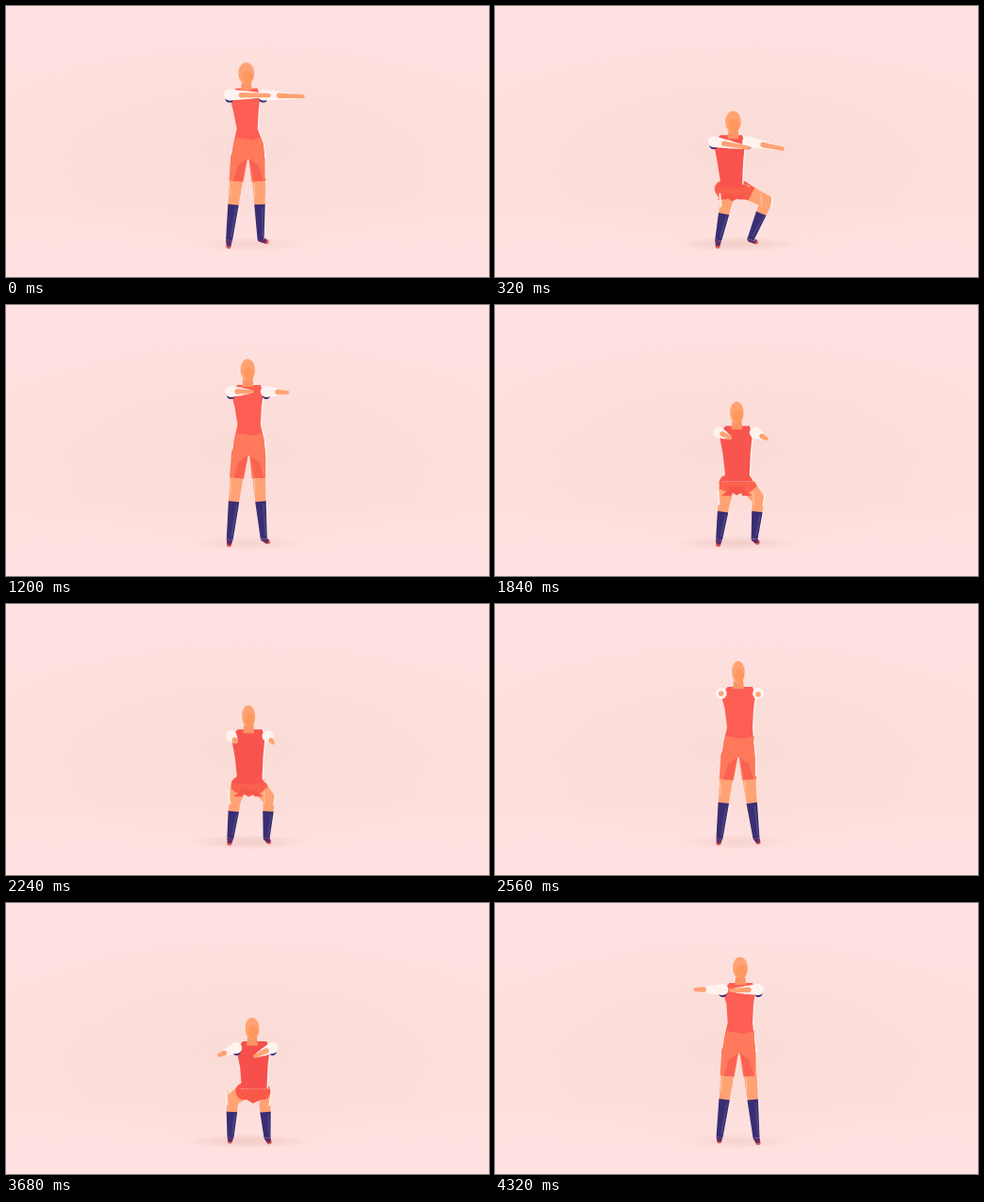
These frames come from a looping animation (512 px wide and 288 px high, 4400 ms). An HTML page with a canvas:

```html
<!DOCTYPE html>
<html lang="en">
<head>
<meta charset="utf-8">
<title>Squats</title>
<style>
html, body { margin: 0; width: 100%; height: 100%; overflow: hidden; background: #ffe1e1; }
canvas { display: block; width: 512px; height: 288px; }
</style>
</head>
<body>
<canvas id="stage" width="512" height="288"></canvas>
<script>
const ctx = document.getElementById('stage').getContext('2d');
const LOOP = 4400, STEP = 80;
const SKIN = '#ffa274', LIGHT = '#ffbd96', WHITE = '#fff3f0', NAVY = '#3a2d73';

// One squat: sink, rise, then rest until the next
const PERIOD = 1575, FIRST_LOW = 470, SINK = 540, RISE = 600;
const STAND_Y = 56, DEPTH = 67;

const mix = (a, b, k) => a + (b - a) * k;
const pt = (x, y) => ({ x, y });
const between = (a, b, k) => pt(mix(a.x, b.x, k), mix(a.y, b.y, k));
const blend = (a, b, k) => `rgb(${a.map((v, i) => Math.round(mix(v, b[i], k)))})`;

// 0 standing, 1 lowest
function squat(t) {
  const p = (t - FIRST_LOW + PERIOD) % PERIOD;
  const gap = Math.min(p / RISE, (PERIOD - p) / SINK, 1);
  return (1 + Math.cos(Math.PI * gap)) / 2;
}

function poly(points, color) {
  ctx.fillStyle = color;
  ctx.beginPath();
  points.forEach(([x, y]) => ctx.lineTo(x, y));
  ctx.closePath();
  ctx.fill();
}

function oval(x, y, rx, ry, color) {
  ctx.fillStyle = color;
  ctx.beginPath();
  ctx.ellipse(x, y, rx, ry, 0, 0, 7);
  ctx.fill();
}

function line(a, b, width, color) {
  ctx.strokeStyle = color;
  ctx.lineWidth = width;
  ctx.beginPath();
  ctx.moveTo(a.x, a.y);
  ctx.lineTo(b.x, b.y);
  ctx.stroke();
}

// Tapered limb; round ends when asked
function limb(a, b, wa, wb, color, round = true) {
  const d = Math.hypot(b.x - a.x, b.y - a.y) || 1;
  const nx = -(b.y - a.y) / d / 2, ny = (b.x - a.x) / d / 2;
  poly([[a.x + nx * wa, a.y + ny * wa], [b.x + nx * wb, b.y + ny * wb],
    [b.x - nx * wb, b.y - ny * wb], [a.x - nx * wa, a.y - ny * wa]], color);
  if (round) {
    oval(a.x, a.y, wa / 2, wa / 2, color);
    oval(b.x, b.y, wb / 2, wb / 2, color);
  }
}

function glow(x, y, rx, ry, rgb, alpha) {
  ctx.save();
  ctx.translate(x, y);
  ctx.scale(rx, ry);
  const g = ctx.createRadialGradient(0, 0, 0, 0, 0, 1);
  g.addColorStop(0, `rgba(${rgb},${alpha})`);
  g.addColorStop(0.5, `rgba(${rgb},${alpha * 0.6})`);
  g.addColorStop(1, `rgba(${rgb},0)`);
  ctx.fillStyle = g;
  ctx.fillRect(-1, -1, 2, 2);
  ctx.restore();
}

function backdrop(s) {
  const g = ctx.createLinearGradient(0, 0, 0, 288);
  g.addColorStop(0, '#ffe1e2');
  g.addColorStop(0.45, '#fee0de');
  g.addColorStop(0.74, '#fedfdd');
  g.addColorStop(0.8, '#ffe1e0');
  g.addColorStop(1, '#ffe1e1');
  ctx.fillStyle = g;
  ctx.fillRect(0, 0, 512, 288);
  glow(256, 150, 290, 120, '244,214,205', 0.4);
  glow(257, 253, 58 + 8 * s, 8, '220,172,162', 0.25 + 0.15 * s);
}

function leg(hip, knee, ankle, toe, s, shorts) {
  const cuff = between(knee, ankle, mix(0.27, 0.33, s));
  limb(ankle, toe, 6, 5, '#d85a50');
  limb(pt(ankle.x, ankle.y - 1), between(ankle, toe, 0.6), 7, 5, '#5a2e6c');
  limb(pt(cuff.x + 0.6, cuff.y), ankle, 12.5, 8, WHITE, false);
  limb(knee, cuff, 12.5, 11, SKIN);
  limb(cuff, ankle, 11.5, 7, NAVY, false);
  line(pt(cuff.x + 3, cuff.y + 3), pt(ankle.x + 2, ankle.y - 3), 2, '#4a4279');
  limb(hip, knee, 17, 12.5 + s, SKIN);
  line(pt(knee.x - 5.5, knee.y - 9), pt(knee.x - 5, knee.y + 6), 1.5, LIGHT);
  const hem = between(hip, knee, mix(0.72, 0.35, s));
  limb(hip, hem, 18, 15, shorts, false);
  oval(hip.x, hip.y, 9, 9, shorts);
}

function arm(shoulder, hand, orangeFrom, trim) {
  const elbow = between(shoulder, hand, 0.45);
  const wrist = between(shoulder, hand, 0.8);
  if (trim) oval(shoulder.x, shoulder.y + 4, 4.5, 4, NAVY);
  limb(shoulder, elbow, 12, 8.5, WHITE);
  limb(elbow, wrist, 8.5, 5.5, WHITE);
  limb(between(shoulder, hand, orangeFrom), hand, 5.5, 4, SKIN);
}

function torso(lx, rx, top, waist, hipY, hipX, s, red, shorts) {
  const chest = mix(top, waist, 0.55), seat = mix(waist, hipY, 0.5);
  const left = hipX - 12, right = rx - 6;
  const shape = dx => [[lx + 7, top], [rx - 6, top], [rx - 3, top + 8],
    [rx - 5, chest], [right, waist], [hipX + 16, seat], [hipX + 17.5, hipY],
    [hipX - 17.5, hipY], [hipX - 15.5, seat], [left, waist],
    [lx + 4, chest], [lx, top + 8]].map(([x, y]) => [x + dx, y]);
  poly(shape(1.4), WHITE);
  poly(shape(0), red);
  poly([[left - 0.5, waist + 9], [hipX + 4, waist + 12], [right + 2, waist + 9],
    [hipX + 16, Math.max(seat, waist + 9)], [hipX + 17.5, hipY + 1],
    [hipX - 17.5, hipY + 1], [hipX - 15.5, Math.max(seat, waist + 9)]], shorts);
}

function head(x, top, u) {
  const r = 7 + 1.7 * Math.abs(u);
  limb(pt(x, top + 17), pt(x, top + 30), 9, 12, '#fb9465', false);
  oval(x - r + 1, top + 13, 2.5, 4, WHITE);
  oval(x - 0.8, top + 11.5, r, 11.5, '#ffd3b6');
  oval(x, top + 12, r - 0.3, 11.5, SKIN);
  oval(x + 1, top + 16, r * 0.7, 7, '#ff985f');
}

function draw(t) {
  const s = squat(t);
  const top = STAND_Y + 1 + (DEPTH - 1) * s;
  const u = 1 - t / 2560;          // turn: 1 faces right, 0 front
  const right = Math.max(u, 0);
  const lean = -8 * s * u;         // hips go back as the body sinks
  const red = blend([253, 95, 84], [247, 80, 76], s);
  const shorts = blend([255, 122, 92], [249, 88, 72], s);
  backdrop(s);

  const lx = 239.7 - 2.5 * u + lean, rx = 279 - 6 * right + lean;
  const sy = top + 35 - 2.5 * s;
  const waist = top + 70 + 9 * Math.sin(Math.PI * 0.75 * s);
  const hipX = 258 - u + lean;
  const hipY = mix(159, 202, Math.pow(s, 0.85));
  const kneeY = 194 + 15 * Math.sqrt(s);
  const kneeL = pt(244 - 1.5 * u + s * (6 * u - 2), kneeY);
  const kneeR = pt(270 - 2.5 * u + s * (10 + 16 * u), kneeY);
  const ankleL = pt(238 - 1.5 * right, 249), ankleR = pt(277 - 7 * right, 249 - u);

  leg(pt(hipX - 9.5, hipY - 1), kneeL, ankleL, pt(237 - u, 254 + 1.5 * u), s, shorts);
  leg(pt(hipX + 9.5, hipY - 1), kneeR, ankleR, pt(279 - 3 * right, 253 - 2.5 * u), s, shorts);

  // Inner folds of the shorts
  const fold = mix(25, 7, s), cy = hipY + 4;
  for (const side of [-1, 1]) {
    poly([[hipX + side * 1.5, cy - 3], [hipX + side * 6, cy + fold - 4],
      [hipX + side * 16, cy + fold - 4], [hipX + side * 11, cy + 4]],
      blend([250, 98, 82], [248, 82, 70], s));
  }
  if (s > 0.3) {
    poly([[hipX - 10, hipY - 6], [hipX + 10, hipY - 6], [hipX + 8, hipY + 8],
      [hipX, hipY + 12], [hipX - 8, hipY + 7]], '#f8564a');
    line(pt(kneeL.x - 7, kneeL.y - 9), pt(kneeL.x - 6, kneeL.y + 6), 1.5, WHITE);
    line(pt(kneeR.x + 7, kneeR.y - 5), pt(kneeR.x + 5, kneeR.y + 7), 1.5, WHITE);
  } else {
    line(pt(hipX + 18.5, hipY - 4), pt(hipX + 18.5, 183), 1.2, WHITE);
  }

  torso(lx, rx, sy - 7, waist, hipY - 4 * s, hipX, s, red, shorts);
  head(258 - 3 * u + lean / 2, top, u);

  const drop = 1 + 8 * s, trim = Math.abs(u) > 0.3;
  const shown = mix(0.7, 0.4, right);
  const arms = [
    [pt(rx, sy), pt(rx + 42 * u, sy + drop), u < -0.3 ? 0.35 : shown, trim],
    [pt(lx, sy), pt(lx + 42 * u, sy + drop - 1), u > 0.15 ? 0.3 : 0.7, trim]
  ];
  if (u < 0) arms.reverse();
  arms.forEach(a => arm(...a));
}

const start = performance.now();
function tick() {
  const t = (performance.now() - start) % LOOP;
  draw(Math.floor(t / STEP) * STEP);
  requestAnimationFrame(tick);
}
tick();
</script>
</body>
</html>
```
